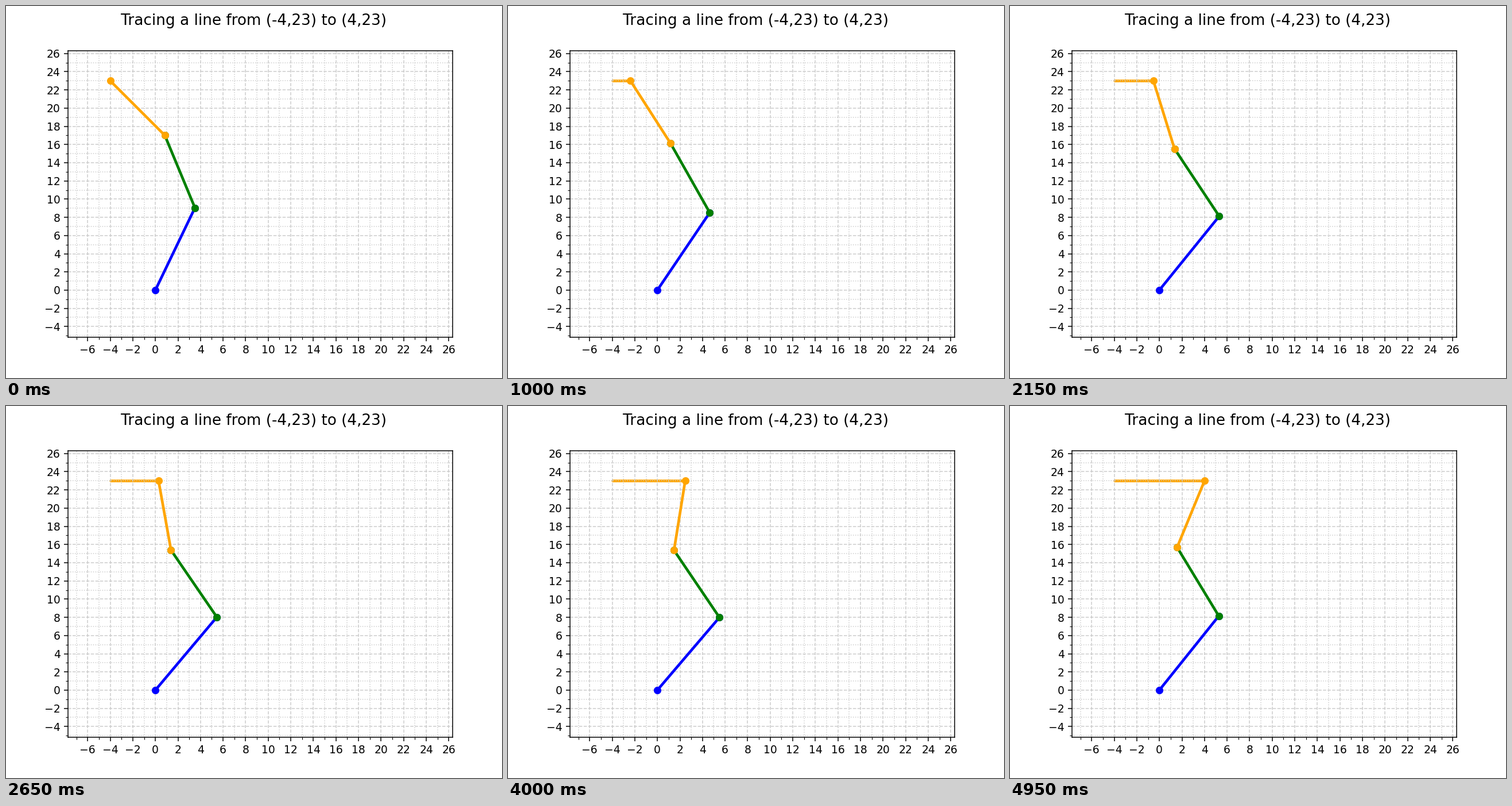
Animation, 864 px wide and 648 px high, one loop 5000 ms. Source, as a matplotlib script:

```python
import numpy as np
import matplotlib.pyplot as plt
from matplotlib.animation import FuncAnimation
from matplotlib.ticker import AutoMinorLocator, MultipleLocator

FRAMES = 100
L1, L2, L3 = 9.7, 8.4, 7.7
REACH = L1 + L2 + L3

path = np.column_stack([np.linspace(-4, 4, FRAMES), np.full(FRAMES, 23.0)])
tilt = np.linspace(2.25, 1.25, FRAMES)  # absolute angle of the last link


def joints(tip, angle):
    """Solve the arm so the last link ends at tip with the given angle."""
    wrist = tip - L3 * np.array([np.cos(angle), np.sin(angle)])
    dist = np.hypot(*wrist)
    bend = np.arccos((L1**2 + dist**2 - L2**2) / (2 * L1 * dist))
    shoulder = np.arctan2(wrist[1], wrist[0]) - bend
    elbow = L1 * np.array([np.cos(shoulder), np.sin(shoulder)])
    return np.array([(0, 0), elbow, wrist, tip])


fig, ax = plt.subplots(figsize=(6.4, 4.8), dpi=135)
fig.suptitle("Tracing a line from (-4,23) to (4,23)", fontsize=14)
ax.set_xlim(-0.3 * REACH, 1.02 * REACH)
ax.set_ylim(-0.2 * REACH, 1.02 * REACH)
for axis in (ax.xaxis, ax.yaxis):
    axis.set_major_locator(MultipleLocator(2))
    axis.set_minor_locator(AutoMinorLocator(2))
ax.grid(which="major", color="#CCCCCC", linestyle="--")
ax.grid(which="minor", color="#CCCCCC", linestyle=":")

# The trace lies below the grid, the links above it.
trace = ax.scatter([], [], s=2, color="orange")
links = [ax.plot([], [], "o-", color=c, lw=2.5)[0]
         for c in ("blue", "green", "orange")]


def update(i):
    points = joints(path[i], tilt[i])
    for k, link in enumerate(links):
        link.set_data(points[k:k + 2].T)
    trace.set_offsets(path[:i + 1])
    return [trace, *links]


anim = FuncAnimation(fig, update, frames=FRAMES, interval=50, repeat=True)
plt.show()
```
